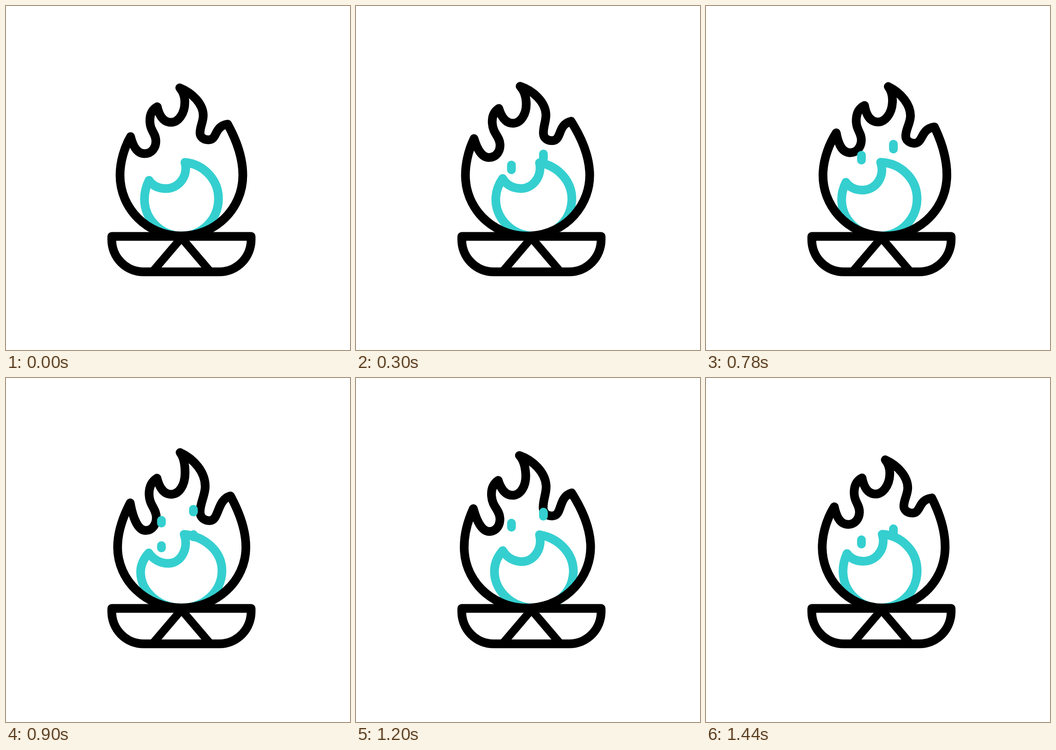
These frames come from a looping animation (748x748 px, 1500 ms). An HTML page:

```html
<!DOCTYPE html>
<html lang="en">
<head>
<meta charset="utf-8">
<title>Campfire</title>
<style>
  html, body { margin: 0; height: 100%; overflow: hidden; background: #fff; }
  svg { display: block; width: 100vw; height: 100vh; }
  path { fill: none; stroke: #000; stroke-width: 19; stroke-linecap: round; stroke-linejoin: round; }
  .teal { stroke: #35cfcf; }
  .logs { stroke-width: 17.5; }
</style>
</head>
<body>
<svg viewBox="0 0 748 748">
  <path id="inner" class="teal"/>
  <path id="outer"/>
  <path d="M230 501V508A69 70 0 0 0 299 578H464A69 70 0 0 0 533 508V501Z"/>
  <path class="logs" d="M318.5 578L381.5 504L444.5 578"/>
  <path id="sparks" class="teal"/>
</svg>
<script>
const LOOP = 1500, SWAY = 910, STRETCH = 364, ANGLE = 4.2;
const SPARK_STARTS = [68, 430, 790, 1242], SPARK_LIFE = 540, SPARK_LAG = 60;

// Each flame has a resting and a stretched outline with matching points.
const flames = {
  outer: {
    turn: -1,
    rest: `M378 178 C406 189 429 214 429 238 C429 252 422 262 422 276 C422 285 430 291 440 291
      C461 291 451 262 482 257 C503 295 515 334 515 368 C515 441 455 500 381 500
      C308 500 248 441 248 368 C248 338 258 306 271 284 C277 308 287 321 301 321
      C317 321 326 308 326 294 C326 276 313 272 313 249 C313 235 318 225 329 219
      C334 241 344 253 359 253 C374 253 389 235 389 209 C389 195 385 186 378 178Z`,
    tall: `M377 162 C408 176 432 205 432 236 C432 254 421 272 421 291 C421 303 430 310 442 310
      C463 310 457 264 487 256 C509 296 521 334 521 368 C521 441 457 500 381 500
      C305 500 242 441 242 368 C242 335 254 301 269 272 C276 310 288 332 303 332
      C318 332 326 318 326 304 C326 284 310 277 310 252 C310 236 316 225 327 218
      C333 241 343 253 358 253 C374 253 388 235 388 207 C388 188 385 172 377 162Z`
  },
  inner: {
    turn: 1,
    rest: `M389 340 C430 344 462 378 462 419 C462 464 426 500 382 500 C337 500 301 464 301 420
      C301 404 305 391 311 379 C319 391 332 397 348 397 C375 397 397 370 389 340Z`,
    tall: `M388 340 C434 345 470 378 470 419 C470 464 431 500 382 500 C333 500 293 464 293 422
      C293 405 300 392 311 380 C322 396 338 403 354 403 C380 403 399 372 388 340Z`
  }
};

const el = id => document.getElementById(id);
const ease = p => (1 - Math.cos(Math.PI * Math.min(1, Math.max(0, p)))) / 2;

function blend(from, to, amount) {
  const targets = to.match(/\d+/g);
  let i = 0;
  return from.replace(/\d+/g, n => (+n + (targets[i++] - n) * amount).toFixed(2));
}

function sparkPath(age) {
  if (age <= 0 || age >= SPARK_LIFE) return '';
  const head = 371 - 64 * ease(age / SPARK_LIFE);
  const tail = 371 - 64 * ease((age - SPARK_LAG) / SPARK_LIFE) + 0.01;
  return `M338 ${tail}V${head}M407.5 ${tail - 24}V${head - 24}`;
}

function draw(now) {
  const t = now % LOOP;
  const stretch = (1 - Math.cos(2 * Math.PI * t / STRETCH)) / 2;
  const angle = ANGLE * Math.sin(2 * Math.PI * t / SWAY);
  for (const [id, { turn, rest, tall }] of Object.entries(flames)) {
    el(id).setAttribute('d', blend(rest, tall, stretch));
    el(id).setAttribute('transform', `rotate(${turn * angle} 381 500)`);
  }
  el('sparks').setAttribute('d', SPARK_STARTS.map(start => sparkPath(t - start)).join(''));
}

const begin = performance.now();
function tick() {
  draw(performance.now() - begin);
  requestAnimationFrame(tick);
}
tick();
</script>
</body>
</html>
```
